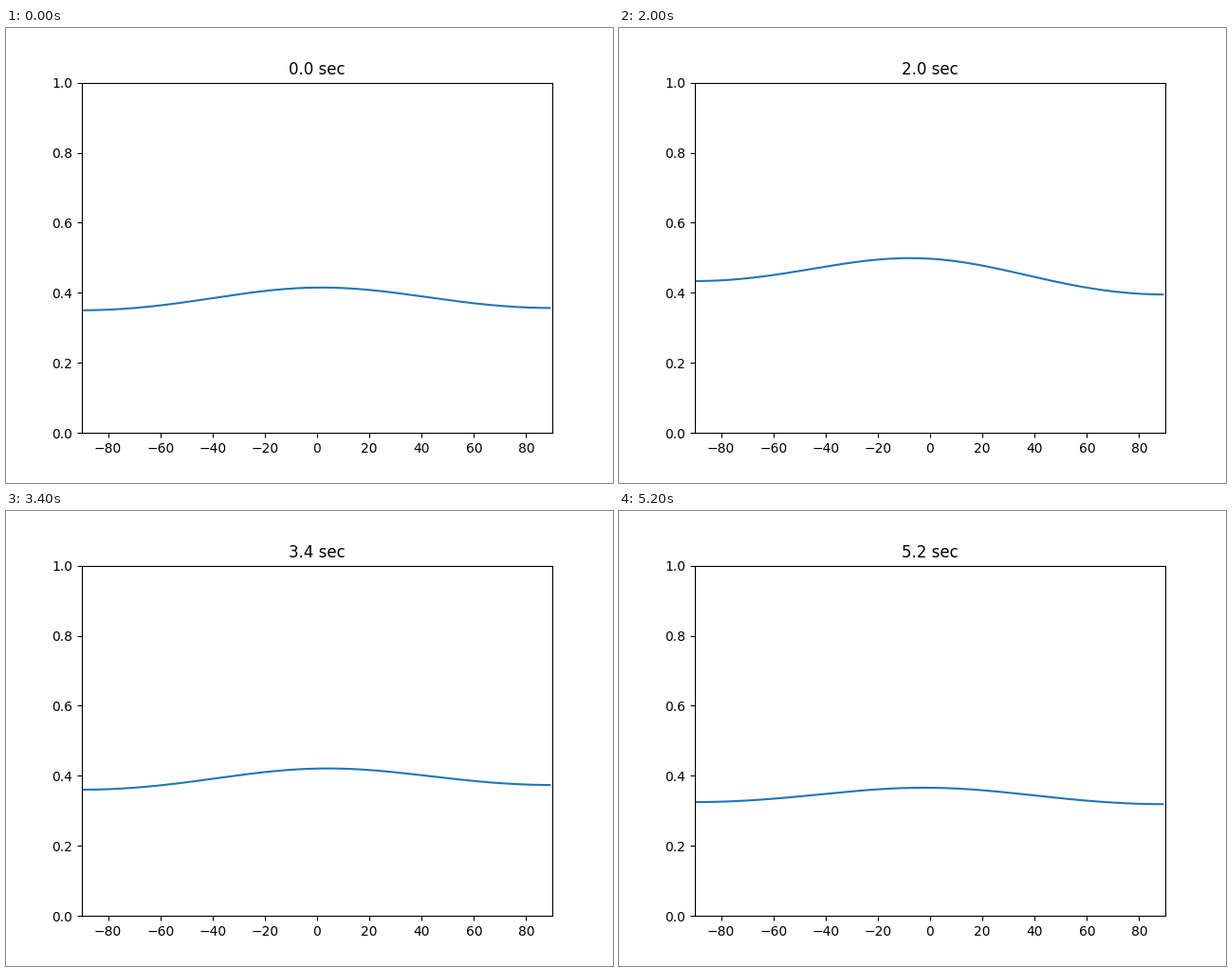
Animation of 640 by 480 pixels, one loop 5400 ms. Source, as a matplotlib script:

```python
import numpy as np
import matplotlib.pyplot as plt
from matplotlib.animation import FuncAnimation

FRAMES = 27
STEP = 0.2  # seconds per frame
K = 1.3     # phase shift at 90 degrees

# The lobe drifts between a few poses.
TIMES = (0, 0.6, 1.4, 2.0, 2.8, 4.0, 5.2)
PEAK = (0.415, 0.396, 0.454, 0.499, 0.432, 0.410, 0.366)
DEPTH = (0.084, 0.078, 0.098, 0.115, 0.074, 0.073, 0.060)
CENTER = (0.031, 0.257, 0.197, -0.134, 0.022, 0.123, -0.040)

angles = np.arange(-90, 90)
sines = np.sin(np.radians(angles))


def lobe(t):
    peak, depth, center = (np.interp(t, TIMES, row) for row in (PEAK, DEPTH, CENTER))
    return peak - depth * (1 - np.cos(K * (sines - center)))


fig, ax = plt.subplots(figsize=(6.4, 4.8), dpi=100)
ax.set_xlim(-90, 90)
ax.set_ylim(0, 1)
line, = ax.plot(angles, lobe(0))
title = ax.set_title("0.0 sec")


def update(i):
    t = i * STEP
    line.set_ydata(lobe(t))
    title.set_text(f"{t:.1f} sec")
    return line, title


anim = FuncAnimation(fig, update, frames=FRAMES, interval=200,
                     repeat=True, repeat_delay=0, blit=False)
plt.show()
```
